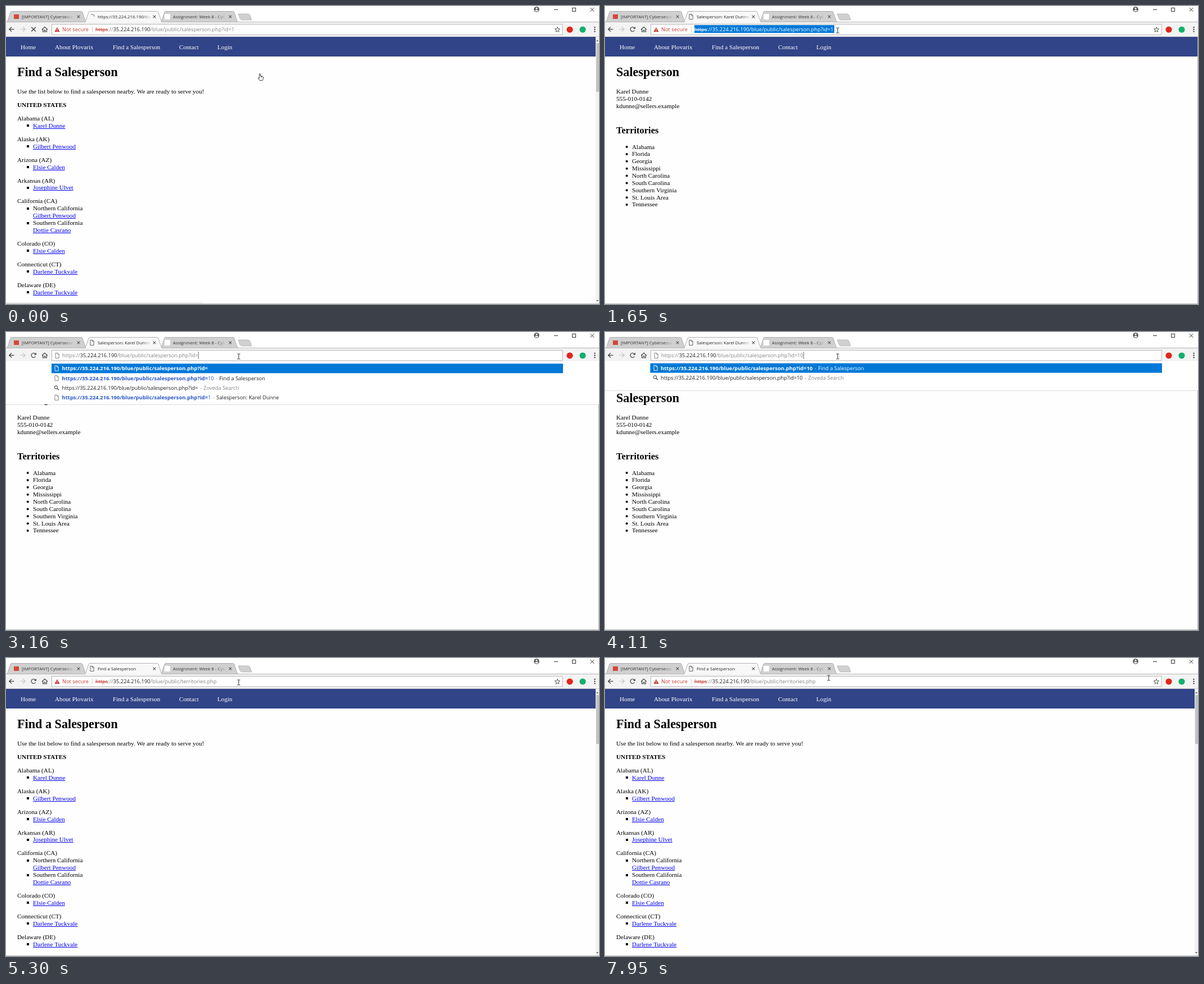
An HTML page with a canvas for the animation above (8000 ms loop, 1055x531 px).

```html
<!DOCTYPE html>
<html lang="en">
<head>
<meta charset="utf-8">
<title>Find a Salesperson</title>
<style>
html, body { margin: 0; width: 100%; height: 100%; overflow: hidden; background: #fff; }
canvas { display: block; width: 1055px; height: 531px; }
</style>
</head>
<body>
<canvas id="stage" width="1055" height="531"></canvas>
<script>
const c = document.getElementById('stage').getContext('2d');
const LOOP = 8000;
const SERIF = '"Liberation Serif", "Times New Roman", serif';
const SANS = '"Open Sans", "Noto Sans", sans-serif';
const UI = '9.3px ' + SANS, UI_BOLD = 'bold 9.45px ' + SANS, TAB = '7.8px ' + SANS;
const BODY = '11.18px ' + SERIF;
const INK = '#222', GREY = '#848484', BLUE = '#0078d7', LINK = '#2a56c6';
const HOST = '35.224.216.190', PATH = '/blue/public/salesperson.php?id=';
const BASE = 'https://' + HOST + PATH;
const REP = 'Karel Dunne';

const REGIONS = [
  ['Alabama (AL)', '>' + REP],
  ['Alaska (AK)', '>Gilbert Penwood'],
  ['Arizona (AZ)', '>Elsie Calden'],
  ['Arkansas (AR)', '>Josephine Ulvet'],
  ['California (CA)', 'Northern California', '>Gilbert Penwood', 'Southern California', '>Dottie Casrano'],
  ['Colorado (CO)', '>Elsie Calden'],
  ['Connecticut (CT)', '>Darlene Tuckvale'],
  ['Delaware (DE)', '>Darlene Tuckvale'],
  ['Florida (FL)']
];
const TERRITORIES = ['Alabama', 'Florida', 'Georgia', 'Mississippi', 'North Carolina',
  'South Carolina', 'Southern Virginia', 'St. Louis Area', 'Tennessee'];

// [time, x, y, shape]
const POINTER = [
  [0, 453, 120, 'hand'], [150, 453, 120, 'arrow'], [830, 465, 104, 'arrow'], [980, 403, 56, 'arrow'],
  [1130, 410, 44, 'beam'], [1260, 414, 43, 'beam'], [6140, 162, 217, 'arrow'],
  [6420, 182, 219, 'arrow'], [6560, 197, 208, 'arrow'], [6700, 176, 176, 'arrow'],
  [6840, 126, 160, 'arrow'], [6980, 86, 172, 'arrow'], [7120, 104, 196, 'arrow'],
  [7260, 150, 164, 'arrow'], [7400, 134, 115, 'arrow'], [7550, 205, 88, 'arrow'],
  [7680, 318, 56, 'arrow'], [7820, 407, 17, 'arrow'], [7950, 398, 35, 'beam']
];

function rect(x, y, w, h, fill) { c.fillStyle = fill; c.fillRect(x, y, w, h); }

function text(s, x, y, font, fill) {
  c.font = font;
  c.fillStyle = fill;
  c.fillText(s, x, y);
  return x + c.measureText(s).width;
}

function poly(points, fill, stroke, width = 1, close = true) {
  c.beginPath();
  for (const [x, y] of points) c.lineTo(x, y);
  if (close) c.closePath();
  if (fill) { c.fillStyle = fill; c.fill(); }
  if (stroke) { c.strokeStyle = stroke; c.lineWidth = width; c.stroke(); }
}

function line(points, stroke, width = 1) { poly(points, null, stroke, width, false); }

function disc(x, y, r, fill) {
  c.beginPath();
  c.arc(x, y, r, 0, 7);
  c.fillStyle = fill;
  c.fill();
}

function arc(x, y, r, from, to, stroke, width = 1) {
  c.beginPath();
  c.arc(x, y, r, from, to);
  c.strokeStyle = stroke;
  c.lineWidth = width;
  c.stroke();
}

function cross(x, y, r, stroke, width) {
  line([[x - r, y - r], [x + r, y + r]], stroke, width);
  line([[x - r, y + r], [x + r, y - r]], stroke, width);
}

function fileIcon(x, y, stroke) {
  poly([[x - 3, y - 4.5], [x + 1, y - 4.5], [x + 3.2, y - 2.2], [x + 3.2, y + 4.5], [x - 3, y + 4.5]], null, stroke, 0.9);
  line([[x + 0.8, y - 4.5], [x + 0.8, y - 2], [x + 3.2, y - 2]], stroke, 0.8);
}

function lens(x, y) {
  arc(x - 1, y - 1, 2.6, 0, 7, '#555', 1.1);
  line([[x + 1, y + 1], [x + 4, y + 4]], '#555', 1.4);
}

// Page

function nav(width) {
  rect(0, 55, width, 35, '#314487');
  const items = [['Home', 26], ['About Plovarix', 87], ['Find a Salesperson', 190], ['Contact', 308], ['Login', 376]];
  for (const [s, x] of items) text(s, x, 76.5, BODY, '#fff');
}

function heading(s) { text(s, 20, 125.4, 'bold 22.2px ' + SERIF, '#000'); }

function listPage() {
  nav(1049);
  heading('Find a Salesperson');
  text('Use the list below to find a salesperson nearby. We are ready to serve you!', 20, 156, BODY, '#000');
  text('UNITED STATES', 20, 180, 'bold 11.18px ' + SERIF, '#000');
  let y = 204;
  for (const [name, ...rows] of REGIONS) {
    text(name, 20, y, BODY, '#000');
    rows.forEach((row, i) => {
      y += 12.87;
      const link = row[0] === '>';
      if (!link || i === 0) rect(37, Math.round(y - 5.5), 4, 4, '#000');
      const end = text(link ? row.slice(1) : row, 48, y, BODY, link ? '#00e' : '#000');
      if (link) rect(48, Math.round(y + 1), end - 48, 1, '#00e');
    });
    y += 24;
  }
  rect(1049, 55, 6, 475, '#f1f1f1');
  rect(1050, 66, 5, 87, '#c1c1c1');
  poly([[1050, 63], [1054, 63], [1052, 60.5]], '#555');
  poly([[1050, 524], [1054, 524], [1052, 526.5]], '#555');
}

function personPage() {
  nav(1055);
  heading('Salesperson');
  [REP, '555-010-0142', 'kdunne@sellers.example'].forEach((s, i) => text(s, 20, 156 + i * 12.87, BODY, '#000'));
  text('Territories', 20, 226.5, 'bold 16.5px ' + SERIF, '#000');
  TERRITORIES.forEach((s, i) => {
    const y = 254.5 + i * 12.87;
    disc(38.7, y - 3.4, 2, '#000');
    text(s, 48, y, BODY, '#000');
  });
}

// Browser frame

function tab(x, w, fill) {
  poly([[x, 28.5], [x + 1.5, 27.5], [x + 7, 11], [x + 9, 9.5], [x + w - 9, 9.5], [x + w - 7, 11], [x + w - 1.5, 27.5], [x + w, 28.5]],
    fill, '#a9a9a9', 0.9);
}

function tabTitle(s, x, end, ink) {
  const fade = c.createLinearGradient(end - 16, 0, end, 0);
  fade.addColorStop(0, ink);
  fade.addColorStop(1, 'rgba(60,60,60,0)');
  c.save();
  c.beginPath();
  c.rect(x, 10, end - x, 18);
  c.clip();
  text(s, x, 22, TAB, fade);
  c.restore();
}

function tabs(s, t) {
  rect(0, 0, 1055, 29, '#fff');
  tab(275, 138, '#d0d0d0');
  tab(1, 142, '#d0d0d0');
  rect(0, 28, 1055, 1, '#b4b4b4');
  tab(140, 138, '#f8f8f8');
  rect(141, 28, 136, 2, '#f4f4f4');
  poly([[413, 14], [431, 14], [434, 16], [437, 25], [419, 25], [416.5, 23]], '#d0d0d0', '#b0b0b0', 0.8);

  rect(14, 15, 9, 8, '#d5473a');
  tabTitle('[IMPORTANT] Cybersecurity', 28, 121, '#333');
  rect(282, 14, 10, 10, '#fff');
  tabTitle('Assignment: Week 8 - Cybersecurity', 297, 391, '#333');
  if (s.loading) {
    const a = t / 130;
    arc(153, 19, 4.2, a - 2, a, '#8a8a8a', 1.2);
  } else fileIcon(153, 19, '#555');
  tabTitle(s.title, 163, 259, '#222');
  for (const x of [129, 264, 399]) cross(x, 19, 2.4, '#555', 1.1);

  disc(944, 6, 4.8, '#5a5a5a');
  disc(944, 4.4, 1.6, '#fff');
  c.beginPath();
  c.ellipse(944, 8.3, 2.9, 1.4, 0, 0, 7);
  c.fill();
  rect(975, 6, 7, 1, '#333');
  c.strokeStyle = '#333';
  c.lineWidth = 1;
  c.strokeRect(1007.5, 3.5, 6, 6);
  cross(1043, 6.5, 3.4, '#333', 1);
}

function toolArrow(x, dir, ink) {
  line([[x - 4.5 * dir, 41.5], [x + 4.5 * dir, 41.5]], ink, 1.3);
  line([[x, 37.5], [x - 4.3 * dir, 41.5], [x, 45.5]], ink, 1.3);
}

function toolbar(s) {
  rect(0, 29, 1055, 25, '#f3f3f3');
  rect(0, 54, 1055, 1, '#d2d2d2');
  toolArrow(10, 1, '#444');
  toolArrow(30, -1, '#c8c8c8');
  if (s.loading) cross(49, 41.5, 3.8, '#444', 1.5);
  else {
    arc(49, 41.5, 3.9, 0.5, 5.5, '#444', 1.3);
    poly([[50, 40.8], [54, 40.8], [54, 36.8]], '#444');
  }
  line([[64, 42], [69, 37.4], [74, 42]], '#444', 1.2);
  line([[65.6, 41], [65.6, 46], [68, 46], [68, 43], [70, 43], [70, 46], [72.4, 46], [72.4, 41]], '#444', 1.1);

  rect(81, 32, 909.5, 19.5, '#b5b5b5');
  rect(82, 33, 907.5, 17.5, '#fff');
  disc(1003, 42, 5.6, '#e0261c');
  disc(1026, 42, 5.6, '#12b06b');
  for (const y of [38, 41.7, 45.4]) disc(1047.5, y, 1.2, '#444');
  address(s);
}

function address(s) {
  const y = 45.3, tail = s.path;
  if (s.editing) {
    fileIcon(91, 42, '#777');
    let x = text('https://', 100, y, UI, GREY);
    x = text(HOST, x, y, UI, INK);
    x = text(tail, x, y, UI, GREY);
    if (s.caret) rect(Math.round(x), 35, 1, 13, '#777');
  } else {
    poly([[91, 37.8], [95.6, 46], [86.4, 46]], '#c5392f');
    rect(90.5, 40.5, 1, 3, '#fff');
    rect(90.5, 44.2, 1, 1, '#fff');
    text('Not secure', 100, y, UI, '#c5392f');
    rect(153, 37, 1, 10, '#ccc');
    const on = s.selected;
    if (on) rect(159, 34, 249, 14, BLUE);
    const ink = color => on ? '#fff' : color;
    let x = text('https', 159, y, UI, ink('#c5392f'));
    rect(159, 42, x - 159, 1, ink('#c5392f'));
    x = text('://', x, y, UI, ink(GREY));
    x = text(HOST, x, y, UI, ink(INK));
    text(tail, x, y, UI, ink(GREY));
    if (s.caret) rect(407, 34, 1, 14, '#777');
    star(981, 42.3);
  }
}

function star(x, y) {
  const points = Array.from({ length: 10 }, (_, i) => {
    const r = i % 2 ? 2.1 : 4.9, a = i * Math.PI / 5 - Math.PI / 2;
    return [x + r * Math.cos(a), y + r * Math.sin(a)];
  });
  poly(points, null, '#555', 1);
}

// rows: [match, rest, note, isSearch]; the first row is highlighted
function suggestions(rows, bottom, x, top) {
  rect(0, 52, 1055, bottom - 52, '#fff');
  rect(0, bottom, 1055, 1, 'rgba(0,0,0,0.13)');
  rect(x - 18.5, top, 1009.5 - x, 17, BLUE);
  rows.forEach(([match, rest, note, search], i) => {
    const y = top + 11.8 + i * 17.4, lit = i === 0;
    if (search) lens(90, y - 3.5);
    else fileIcon(90, y - 3.5, lit ? '#fff' : '#777');
    const ink = lit ? '#fff' : search ? INK : LINK;
    let end = text(BASE + match, x, y, search ? UI : UI_BOLD, ink);
    end = text(rest, end, y, UI, ink);
    if (!note) return;
    end = text(' - ', end + 1, y, UI, lit ? '#cfe4f8' : GREY);
    text(note, end + 1, y, UI, lit ? '#fff' : search ? GREY : INK);
  });
}

const PERSON = 'Salesperson: ' + REP, LIST = 'Find a Salesperson', SEARCH = 'Zoveda Search';

function dropdown(t) {
  if (t < 3840) suggestions([['', '', ''], ['', '10', LIST], ['', '', SEARCH, true], ['', '1', PERSON]], 129, 99.5, 56.4);
  else if (t < 4110) suggestions([['1', '', PERSON], ['1', '', SEARCH, true], ['1', '0', LIST]], 121, 99, 55.7);
  else suggestions([['10', '', LIST], ['10', '', SEARCH, true]], 104, 99, 55.7);
}

// Pointer

function pointer(t) {
  const [, x, y, shape] = POINTER.filter(k => k[0] <= t).pop();
  if (shape === 'arrow') {
    poly([[x, y], [x, y + 9.5], [x + 2, y + 7.7], [x + 3.5, y + 11], [x + 5, y + 10.3], [x + 3.6, y + 7.1], [x + 6.5, y + 6.8]],
      '#fff', '#222', 0.8);
  } else if (shape === 'beam') {
    rect(x - 0.5, y - 4, 1, 9, '#222');
    for (const dy of [-4.5, 4.5]) {
      rect(x - 2.5, y + dy, 2, 1, '#222');
      rect(x + 0.5, y + dy, 2, 1, '#222');
    }
  } else {
    poly([[x - 2.2, y + 1], [x - 1.4, y + 0.3], [x - 0.5, y + 1], [x - 0.5, y + 4.5], [x + 3.6, y + 5.3], [x + 4.8, y + 6.5],
      [x + 4.6, y + 9.5], [x + 3.4, y + 12.7], [x - 1.6, y + 12.7], [x - 4.5, y + 8.5], [x - 4, y + 7.5], [x - 2.2, y + 8.8]],
      '#fff', '#222', 0.9);
    for (const dx of [0.9, 2.5]) line([[x + dx, y + 5], [x + dx, y + 7.5]], '#222', 0.7);
  }
}

function stateAt(t) {
  const loading = t < 150 || (t >= 4510 && t < 5030);
  const list = t < 150 || t >= 5030;
  const editing = t >= 3160 && t < 4510;
  let path = PATH + '1';
  if (t >= 5030) path = '/blue/public/territories.php';
  else if (t >= 3980) path = PATH + '10';
  else if (t >= 3160 && t < 3700) path = PATH;
  return {
    loading, list, editing, path,
    title: loading ? 'https://' + HOST + '/blue/public' : list ? LIST : PERSON,
    selected: t >= 1390 && t < 2350,
    caret: editing || (t >= 2350 && t < 2860)
  };
}

function draw(t) {
  const s = stateAt(t);
  rect(0, 0, 1055, 531, '#fefefe');
  (s.list ? listPage : personPage)();
  if (t < 150) {
    rect(0, 528, 350, 3, '#f8f8f8');
    rect(0, 528, 350, 1, '#e6e6e6');
  }
  if (t >= 5030 && t < 5740) rect(0, 527, 60, 4, '#fdfdfd');
  if (!s.list) rect(1054, 55, 1, 476, '#b4b4b4');
  rect(0, 530, 1055, 1, 'rgba(110,110,110,0.45)');
  tabs(s, t);
  toolbar(s);
  if (s.editing) dropdown(t);
  pointer(t);
}

function frame() {
  draw(performance.now() % LOOP);
  requestAnimationFrame(frame);
}
frame();
</script>
</body>
</html>
```
